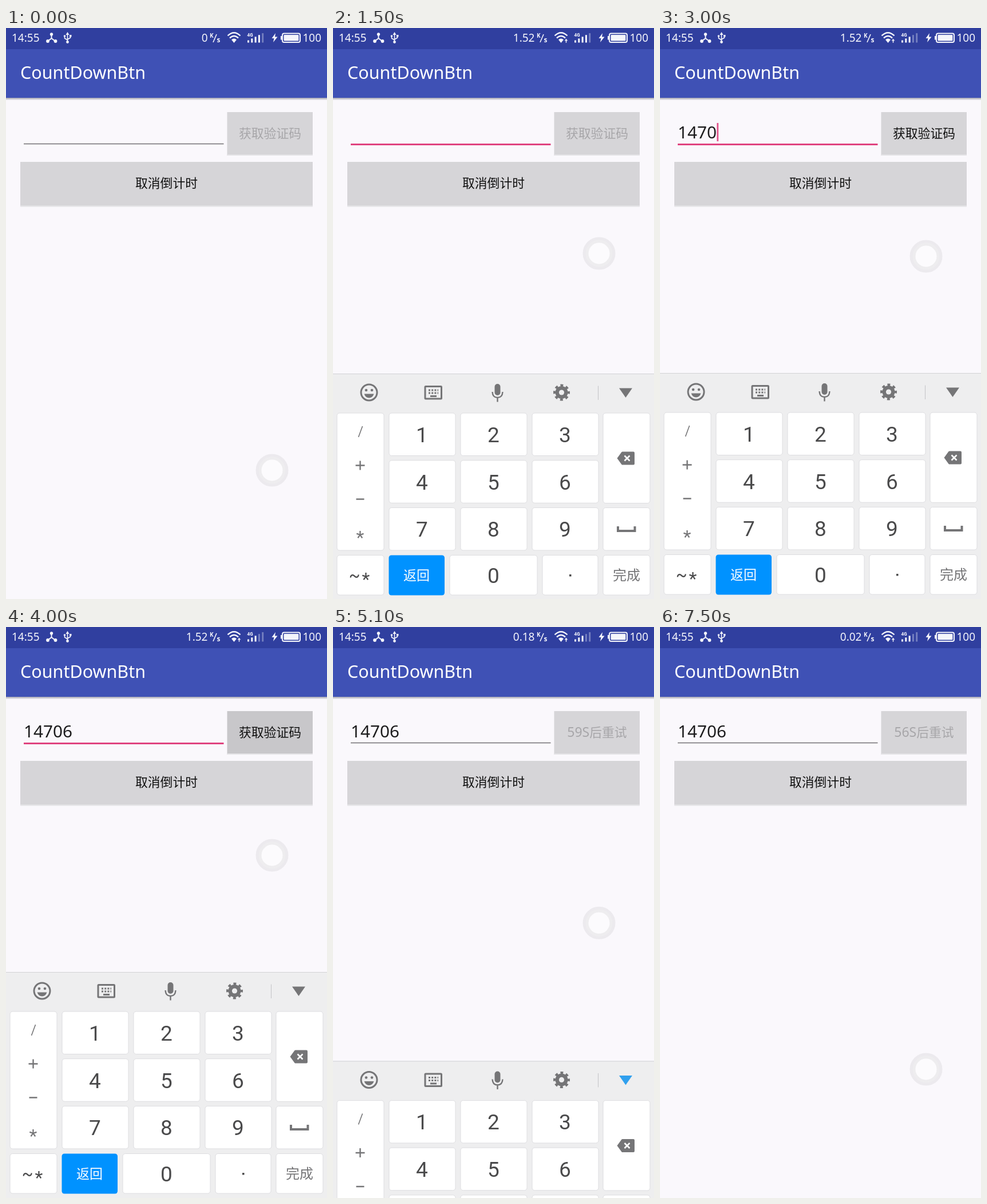
Animation of 561x998 px, one loop 8 s. Source, as an HTML page:

```html
<!DOCTYPE html>
<html lang="zh">
<head>
<meta charset="utf-8">
<title>CountDownBtn</title>
<style>
  html, body { margin: 0; width: 100%; height: 100%; overflow: hidden; background: #faf8fc; }
  svg { display: block; width: 100vw; height: 100vh; font-family: "Noto Sans", "Noto Sans CJK SC", "Noto Sans CJK", sans-serif; }
  .mid { text-anchor: middle; }
  .cjk { font-size: 21.8px; font-family: "Noto Sans CJK SC", "Noto Sans CJK", sans-serif; }
  .status { fill: #f4f5fb; font-size: 19px; }
  .line { fill: none; stroke: #f4f5fb; stroke-width: 2; }
  .key { fill: #fff; stroke: #dddde0; }
  .digit { font: 37px Roboto, sans-serif; fill: #4a4a4b; }
  .sign { font: 32px Roboto, sans-serif; fill: #757577; }
  .icon { fill: #757577; }
  .draw { fill: none; stroke: #757577; stroke-width: 3; }
  .thin { stroke-width: 1.6; }
  .fine { stroke-width: 2.4; }
  .bold { stroke-width: 4; }
</style>
</head>
<body>
<svg viewBox="0 0 561 998" preserveAspectRatio="none">
  <defs>
    <linearGradient id="shade" x2="0" y2="1">
      <stop stop-color="#9b9ba8"/><stop offset="1" stop-color="#faf8fc"/>
    </linearGradient>
  </defs>
  <rect width="561" height="998" fill="#faf8fc"/>
  <rect y="121.500" width="561" height="5" fill="url(#shade)"/>
  <rect y="36" width="561" height="86" fill="#3f51b5"/>
  <rect width="561" height="37" fill="#303f9f"/>
  <text x="25" y="88.500" font-size="30.500" fill="#fff">CountDownBtn</text>

  <g class="status">
    <path class="line" d="M79.500 11V18L73 23M79.500 18L86 23"/>
    <circle cx="79.500" cy="11" r="2.700"/><circle cx="73" cy="23" r="2.900"/><circle cx="86.500" cy="23" r="2.900"/>
    <text x="10" y="24">14:55</text>
    <path class="line thin" d="M107.500 11V24M102.500 14V18L107.500 21M112.500 13V17L107.500 20"/>
    <path d="M104.500 12L107.500 7L110.500 12Z"/><circle cx="107.500" cy="24.500" r="2.400"/>
    <circle cx="102.500" cy="14" r="1.800"/><path d="M111 12h3.500v3.500h-3.500z"/>
    <text id="speed" x="352.500" y="24" text-anchor="end"></text>
    <text x="356" y="17" font-size="10" font-weight="700">K</text>
    <path class="line thin" d="M368 11L362 25"/>
    <text x="368.500" y="25" font-size="12" font-weight="600">s</text>
    <path class="line fine" d="M387.500 13.500Q398.500 3 409.500 13.500M391 17.500Q398.500 10.500 406 17.500"/>
    <path d="M394 20.500Q398.500 16.500 403 20.500L398.500 26Z"/>
    <path id="arrow" d="M407.500 18.500l3.200 4h-2.200v3.500h-2v-3.500h-2.200z" stroke="#303f9f" stroke-width=".5"/>
    <text x="421.500" y="14.500" font-size="8" font-weight="700">4G</text>
    <g id="bars"></g>
    <path d="M471 9L464.500 18H468.500L467 25L474.500 15.500H470Z"/>
    <rect class="line" x="483" y="9.500" width="31" height="15.500" rx="3"/>
    <rect x="485.500" y="12" width="26" height="10.500" rx="1"/><path d="M480 14h3v6.500h-3z"/>
    <text x="518.500" y="24">100</text>
  </g>

  <g>
    <path d="M386 222H536M25 311.500H536" stroke="#e4e3e6" stroke-width="2"/>
    <rect id="send" x="386.500" y="147" width="149.500" height="74"/>
    <rect x="25" y="234" width="511" height="76.500" fill="#d6d5d8"/>
    <text class="mid cjk" id="label" x="461.500" y="191.800"></text>
    <text class="mid cjk" x="280.500" y="279" fill="#111">取消倒计时</text>
    <rect id="under" x="31" width="349.500"/>
    <text id="entry" x="31" y="192.500" font-size="29.700" fill="#1c1c1d"></text>
    <rect id="caret" y="166" width="2.800" height="32" fill="#e0437f"/>
  </g>

  <g id="board">
    <rect y="603" width="561" height="400" fill="#eeeeef"/>
    <path d="M0 603.500H561" stroke="#d2d2d5"/>
    <circle class="draw" cx="63" cy="636" r="14"/>
    <g class="icon">
      <circle cx="58" cy="632" r="2.300"/><circle cx="68" cy="632" r="2.300"/>
      <path d="M54.500 638.500H71.500Q69 645.500 63 645.500T54.500 638.500Z"/>
      <rect x="282.500" y="621" width="10" height="20" rx="5"/>
      <circle cx="399.500" cy="636" r="11"/>
      <path id="tri" d="M500 628.500H523L511.500 645Z"/>
    </g>
    <rect class="draw" x="161" y="625.500" width="28.500" height="21.500" rx="1"/>
    <path class="draw" stroke-dasharray="3 2.200" d="M167 632H184M167 637H184"/>
    <path class="draw" d="M170 642.500H181"/>
    <path class="draw fine" d="M278.500 635Q279 645 287.500 645T296.500 635M287.500 645V652.500"/>
    <circle cx="399.500" cy="636" r="12" fill="none" stroke="#757577" stroke-width="5" stroke-dasharray="4.712" stroke-dashoffset="2.356"/>
    <circle cx="399.500" cy="636" r="4.600" fill="#eeeeef"/>
    <path d="M463.500 624.500V649" stroke="#c4c4c7"/>
    <g id="keys"></g>
    <path class="icon" d="M496.500 751L504.500 740Q505 739.500 506 739.500H525Q527 739.500 527 741.500V760.500Q527 762.500 525 762.500H506Q505 762.500 504.500 762Z"/>
    <path d="M509.500 746.500L518.500 755.500M518.500 746.500L509.500 755.500" stroke="#fff" stroke-width="2.600"/>
    <path class="draw bold" d="M498 870V878H527.500V870"/>
    <path class="draw thin" d="M51.500 695L44.500 714"/>
    <path class="draw fine" d="M39.500 763.500H55.500M47.500 755.500V771.500M40.500 822.500H54.500"/>
  </g>
  <circle id="ring" cx="465" r="23.500" fill="#fff" fill-opacity=".5" stroke="#000" stroke-opacity=".055" stroke-width="10"/>
</svg>
<script>
const $ = id => document.getElementById(id);
const set = (id, attrs) => {
  for (const name in attrs) $(id).setAttribute(name, attrs[name]);
};
const CODE = '14706';

// Keyboard: boxes and the signs on them
const box = (x, y, w, h, id = '') =>
  `<rect class="key" ${id && `id="k${id}"`} x="${x}" y="${y}" width="${w}" height="${h}" rx="4.500"/>`;
const word = (x, y, s, cls, more = '') => `<text class="mid ${cls}" x="${x}" y="${y}" ${more}>${s}</text>`;
let keys = box(7, 672, 82, 240) + box(472, 672, 82, 157.500) + box(472, 837.500, 82, 74.500)
  + box(204, 920.500, 153, 69.500, '0') + word(280.500, 968.500, '0', 'digit');
for (let n = 0; n < 9; n++) {
  const x = 98 + n % 3 * 125, y = 672 + Math.floor(n / 3) * 82.700;
  keys += box(x, y, 116, 74.500, n + 1) + word(x + 57.500, y + 51, n + 1, 'digit');
}
for (const [x, w] of [[7, 82], [366, 97], [472, 82]]) keys += box(x, 920.500, w, 69.500);
keys += '<rect x="97.500" y="920.500" width="97.500" height="70" rx="4.500" fill="#0092ff"/>'
  + word(47.500, 900, '*', 'sign')
  + word(37.500, 966, '~', 'digit', 'style="font-size:29px"')
  + word(57.500, 973, '*', 'sign', 'style="fill:#4a4a4b"')
  + '<rect x="413" y="954" width="3.500" height="3.500" fill="#4a4a4b"/>'
  + word(146, 963.500, '返回', 'cjk', 'fill="#fff" style="font-size:23px"')
  + word(513, 964, '完成', 'cjk', 'fill="#757577" style="font-size:24px"');
$('keys').innerHTML = keys;
$('bars').innerHTML = [0, 1, 2, 3, 4].map(i =>
  `<rect id="bar${i}" x="${422 + i * 6.300}" y="${21.500 - i * 3.100}" width="3" height="${4 + i * 3.100}"/>`).join('');

// Value of the latest step that has begun
const at = (t, steps) => steps.filter(([start]) => start <= t).pop()[1];
const ramp = (t, from, to) => Math.min(1, Math.max(0, (t - from) / (to - from)));
const smooth = p => p * p * (3 - 2 * p);
const within = (t, from, to) => t >= from && t < to;

function render(t) {
  const focus = within(t, 1100, 5000);
  const ready = within(t, 1800, 4200);
  const typed = at(t, [[0, 0], [1800, 1], [2600, 2], [2800, 3], [3000, 4], [3300, 5]]);
  const down = at(t, [[0, 0], [2500, 1], [2600, 0], [2700, 2], [2800, 0], [2900, 3], [3000, 0], [3200, 4], [3300, 0]]);

  $('speed').textContent = at(t, [[0, '0'], [1500, '1.52'], [4500, '0.18'], [7500, '0.02']]);
  set('arrow', { opacity: +(within(t, 700, 6200) || t >= 7200) });
  set('bar3', { opacity: t < 2700 ? 1 : .35 });
  set('bar4', { opacity: .35 });

  set('send', { fill: within(t, 4000, 4200) ? '#c8c7ca' : '#d6d5d8' });
  const left = 59 - Math.floor((t - 4200) / 1000);
  $('label').innerHTML = t < 4200 ? '获取验证码'
    : `<tspan font-family="Noto Sans, sans-serif" font-size="23">${left}S</tspan>后重试`;
  set('label', { fill: ready ? '#111' : '#a7a6a9' });

  set('under', focus ? { y: 202, height: 3, fill: '#e0437f' } : { y: 201.700, height: 1.600, fill: '#777679' });
  $('entry').textContent = CODE.slice(0, typed);
  const blink = within(t, 1800, 3800) || within(t, 4300, 4800);
  set('caret', { x: 31 + typed * 17.100, opacity: blink ? within(t, 2300, 2500) ? .6 : .9 : 0 });

  for (let n = 0; n < 10; n++)
    $('k' + n).style.fill = down && n == CODE[down] ? '#dcdcdf' : '';
  $('tri').style.fill = t >= 4800 ? '#30a0ee' : '';

  const hidden = t < 4800 ? (1 - ramp(t, 1100, 1600)) ** 3.700 : smooth(ramp(t, 4800, 5500));
  set('board', { transform: `translate(0 ${395 * hidden})` });
  const rise = 379 * smooth(ramp(t, 1100, 1500)) - 5 * ramp(t, 1500, 1600);
  set('ring', { cy: 773 - rise * (1 - smooth(ramp(t, 4800, 5600))) });
}

// The picture ticks ten times a second
function frame(now) {
  render(Math.floor(now % 8000 / 100) * 100);
  requestAnimationFrame(frame);
}
render(0);
requestAnimationFrame(frame);
</script>
</body>
</html>
```
